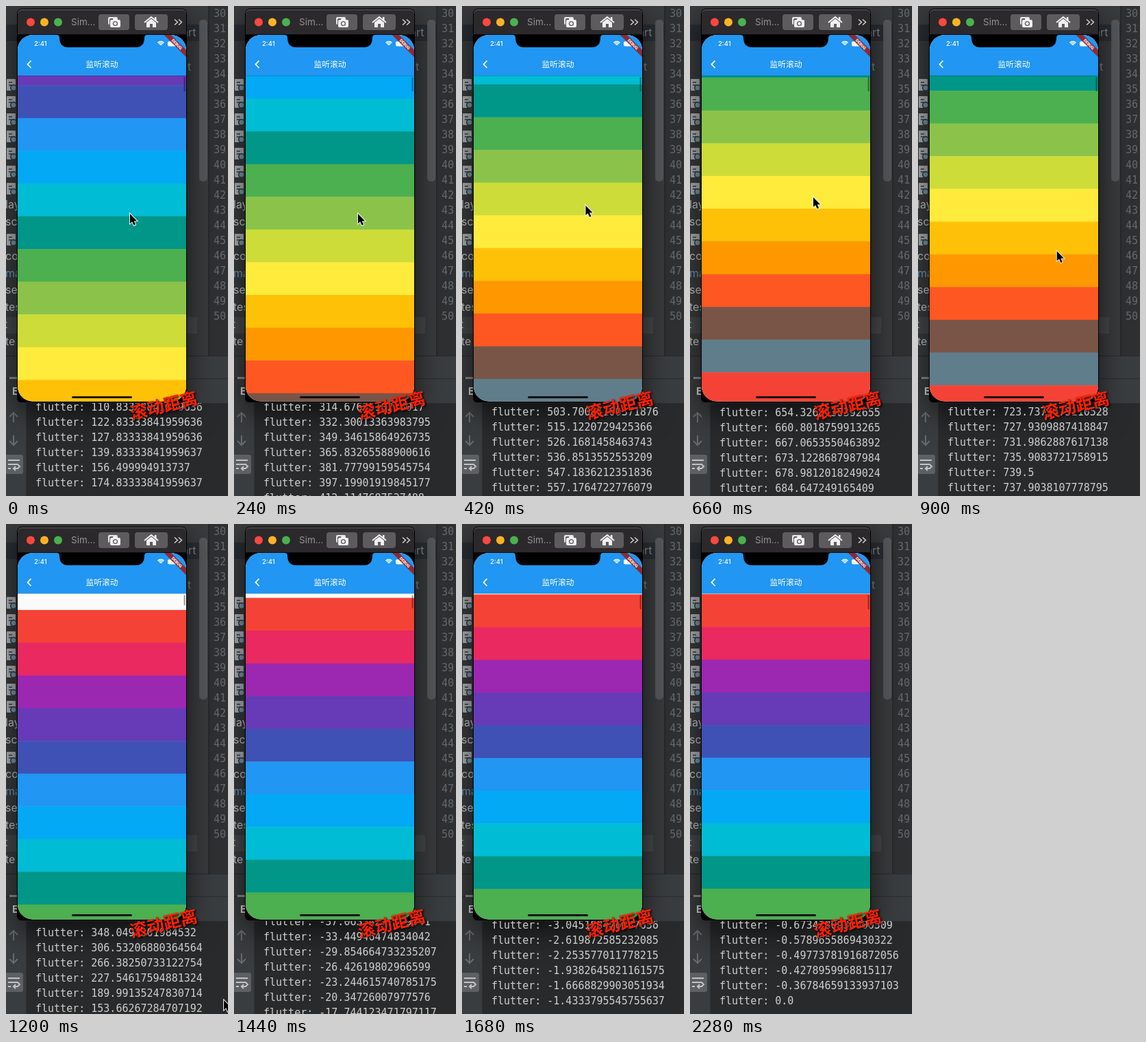
Write an HTML page with a canvas that moves like this. It is 324 px wide and 712 px high and loops after 2.34 s.

```html
<!DOCTYPE html>
<html lang="zh">
<head>
<meta charset="utf-8">
<style>
  html, body { margin: 0; width: 100%; height: 100%; overflow: hidden; background: #2b2b2b; }
  canvas { display: block; }
</style>
</head>
<body>
<canvas id="stage" width="324" height="712"></canvas>
<script>
const ctx = document.getElementById('stage').getContext('2d');
const LOOP = 2340, STEP = 60;
const MONO = '"DejaVu Sans Mono", monospace';
const SANS = 'Inter, "Liberation Sans", sans-serif';
const CJK = '"Noto Sans CJK SC", "Noto Sans CJK", sans-serif';
const SCALE = 0.5945, ITEM = 80 * SCALE, LIST_TOP = 101.8;
const COLORS = ['#f44336', '#e9295f', '#9c27b0', '#673ab7', '#3f51b5', '#2196f3',
  '#03a9f4', '#00bcd4', '#009688', '#4caf50', '#8bc34a', '#cddc39',
  '#ffeb3b', '#ffc107', '#ff9800', '#ff5722', '#795548', '#607d8b'];

// Printed values, keyed by the index of the first line of each run.
const PRINTED = {
  0: '110.83333841959636 122.83333841959636 127.83333841959636 139.83333841959637 156.499994913737 174.83333841959637',
  12: '314.6763510278017 332.30013363983795 349.34615864926735 365.83265588900616 381.77799159545754 397.19901919845177 412.1147687537488',
  42: '654.3268130392655 660.8018759913265 667.0653550463892 673.1228687987984 678.9812018249024 684.647249165409',
  60: '737.9038107778795 716.5704825308092 687.9038107778795 652.9038107778795 617.9038107778795 582.9038107778795 535.9038107778795',
  70: '348.0493301984532 306.53206880364564 266.38250733122754 227.54617594881324 189.99135247830714 153.66267284707192',
  105: '-3.045188476937656 -2.619872585232085 -2.253577011778215 -1.9382645821161575 -1.6668829903051934 -1.4333795545755637',
  115: '-0.6734180930400509 -0.5789655869430322 -0.49773781916872056 -0.4278959968815117 -0.36784659133937103 0.0'
};
const log = [];
for (const first in PRINTED) {
  PRINTED[first].split(' ').forEach((value, n) => { log[+first + n] = value; });
}

// Scroll position per 60 Hz tick: fling, drag back, fling, then spring at the edge.
function scrollAt(tick) {
  const drag = 0.96715;
  if (tick < 59) return 851.38 - 454.18 * drag ** (tick - 17);
  if (tick < 60) return 739.5 - 1.6 * (tick - 59);
  if (tick < 66) {
    const i = Math.floor(tick);
    return +log[i] + (log[i + 1] - log[i]) * (tick - i);
  }
  if (tick < 67) return 535.9 - 54 * (tick - 66);
  if (tick < 79.64) return -916 + 1264.05 * drag ** (tick - 70);
  if (tick >= 120) return 0;
  const s = (tick - 79.64) / 60;
  return -142 * (Math.exp(-9.08 * s) - Math.exp(-22 * s));
}

const TICKS = [[0, 11.05], [240, 25.1], [660, 53.2], [742, 59], [868, 60], [1020, 70], [1200, 81.9], [1680, 113], [1860, 124]];
const LINES = [[0, 5], [240, 17.01], [660, 46.64], [850, 59], [924, 60], [1020, 65.27], [1200, 74.5], [1680, 110], [1860, 120]];
const POINTER = [[0, 181, 302], [240, 181, 302], [600, 180, 278], [868, 180, 278], [1020, 288, 650], [1200, 318, 692], [1260, 340, 716]];

function track(keys, t, axis = 1) {
  const i = keys.findIndex(k => k[0] > t);
  if (i < 0) return keys[keys.length - 1][axis];
  const a = keys[i - 1], b = keys[i];
  return a[axis] + (b[axis] - a[axis]) * (t - a[0]) / (b[0] - a[0]);
}

function rect(x, y, w, h, color) {
  ctx.fillStyle = color;
  ctx.fillRect(x, y, w, h);
}
function round(x, y, w, h, r, color) {
  ctx.fillStyle = color;
  ctx.beginPath();
  ctx.roundRect(x, y, w, h, r);
  ctx.fill();
}
function disc(x, y, r, color) {
  ctx.fillStyle = color;
  ctx.beginPath();
  ctx.arc(x, y, r, 0, 7);
  ctx.fill();
}
function line(points, color, width) {
  ctx.strokeStyle = color;
  ctx.lineWidth = width;
  ctx.beginPath();
  points.forEach(p => ctx.lineTo(p[0], p[1]));
  ctx.stroke();
}
function text(str, x, y, font, color, align = 'left') {
  ctx.font = font;
  ctx.fillStyle = color;
  ctx.textAlign = align;
  ctx.textBaseline = 'middle';
  ctx.fillText(str, x, y);
}

function drawEditor() {
  rect(0, 0, 324, 712, '#393b3d');
  rect(0, 27, 296, 24, '#292d33');
  rect(0, 452, 279, 24, '#45484a');
  text('art', 257, 39, '16px ' + SANS, '#85888a');
  text('t', 265, 89, '16px ' + SANS, '#85888a');
  round(282, 20, 12, 235, 5, '#55585a');
  rect(297, 0, 27, 508, '#2e3032');
  rect(295, 0, 2, 508, '#272829');
  for (let n = 30; n <= 50; n++) text(n, 303, 12.3 + (n - 30) * 22, '15px ' + MONO, '#66696c');

  [115, 140, 165, 190, 215, 241, 266, 340].forEach(y => {
    round(1, y - 9, 13, 17, 1, '#adb1b4');
    line([[4, y - 4], [9, y - 4]], '#55595c', 2);
    line([[4, y], [9, y]], '#55595c', 2);
    disc(11, y + 4, 5, '#33373a');
    disc(11, y + 4, 3.4, '#7698ad');
  });
  [['lay', 289], ['scr', 314], ['cor', 364], ['ma', 389], ['sec', 413], ['tes', 438], ['t', 463], ['te', 488]]
    .forEach(([s, y]) => text(s, s === 't' ? -3 : -1, y, '16px ' + SANS, s === 'ma' ? '#6f9dbb' : '#c4c6c8'));

  rect(0, 508, 324, 70, '#3a3d3f');
  rect(0, 508, 324, 1, '#292a2b');
  rect(0, 541, 324, 1, '#2b2d2e');
  rect(5, 539, 14, 3, '#8b8e90');
  text('E', 9, 560, 'bold 15px ' + SANS, '#d5d5d5');
}

function drawConsole(t) {
  ctx.save();
  ctx.beginPath();
  ctx.rect(0, 577, 324, 135);
  ctx.clip();
  rect(0, 577, 324, 135, '#292a2c');
  rect(0, 577, 29, 135, '#3a3d3f');
  rect(29, 577, 1, 135, '#303233');
  const gray = '#686b6d', light = '#c0c2c4';
  line([[11, 605], [11, 591]], gray, 2);
  line([[5, 597], [11, 591], [17, 597]], gray, 2);
  line([[11, 624], [11, 638]], gray, 2);
  line([[5, 632], [11, 638], [17, 632]], gray, 2);
  round(-4, 652, 29, 28, 3, '#5d6062');
  line([[3, 660], [20, 660]], light, 2);
  line([[3, 666], [17, 666], [20, 669], [17, 672], [11, 672]], light, 2);
  line([[14, 669], [11, 672], [14, 675]], light, 2);
  line([[3, 672], [7, 672]], light, 2);
  ctx.restore();
}

// Printed over the window shadow so the text keeps its brightness.
function drawLog(t) {
  ctx.save();
  ctx.beginPath();
  ctx.rect(30, 577, 294, 135);
  ctx.clip();
  const bottom = track(LINES, t);
  for (let i = Math.max(0, Math.floor(bottom) - 6); i <= Math.ceil(bottom); i++) {
    const value = log[i] || String(scrollAt(i));
    text('flutter: ' + value, 43, 694.4 + 22 * (i - bottom), '15px ' + MONO, '#cfcfcf');
  }
  ctx.restore();
}

function drawWindow() {
  ctx.save();
  ctx.shadowColor = 'rgba(0,0,0,.65)';
  ctx.shadowBlur = 44;
  ctx.shadowOffsetY = 14;
  round(16, 4, 248, 572, [7, 7, 6, 6], '#000');
  ctx.restore();
  round(17, 5, 246, 37, [6, 6, 0, 0], '#69676a');
  round(17, 6, 246, 36, [6, 6, 0, 0], '#2b292b');
  rect(17, 41, 246, 1, '#0c0c0c');
  ['#fc4740', '#fdb324', '#4bb04f'].forEach((c, i) => disc(36 + 20 * i, 23.5, 6, c));
  text('Sim…', 95, 24, '13.5px ' + SANS, '#939194');
  round(135, 12, 45, 23, 4, '#5d5b5e');
  round(188, 12, 48, 23, 4, '#5d5b5e');

  round(149, 16, 14, 11, 2, '#e8e8e8');
  round(151, 18, 17, 14, 2, '#5d5b5e');
  round(152, 20, 15, 11, 2, '#f0f0f0');
  round(156, 18, 7, 4, 1, '#f0f0f0');
  disc(159.5, 25.5, 3.6, '#5d5b5e');
  disc(159.5, 25.5, 2.2, '#f0f0f0');

  line([[202, 24], [212, 16], [222, 24]], '#f0f0f0', 2);
  rect(217, 16, 2.5, 5, '#f0f0f0');
  ctx.fillStyle = '#f0f0f0';
  ctx.beginPath();
  [[205, 24], [212, 18.5], [219, 24], [219, 31], [214, 31], [214, 26], [210, 26], [210, 31], [205, 31]]
    .forEach(p => ctx.lineTo(...p));
  ctx.fill();
  [246, 252].forEach(x => line([[x, 19.5], [x + 4.5, 23.5], [x, 27.5]], '#d8d8d8', 1.4));
}

function drawAppBar() {
  rect(17, 42, 246, 59, '#2196f3');
  rect(17, 101, 246, 1, 'rgba(0,0,0,.16)');
  text('2:41', 41, 55.5, '500 9.5px ' + SANS, '#fff');
  ctx.fillStyle = '#000';
  ctx.beginPath();
  ctx.moveTo(74, 42);
  ctx.quadraticCurveTo(78, 42, 78, 46);
  ctx.quadraticCurveTo(78, 60, 91, 60);
  ctx.lineTo(189, 60);
  ctx.quadraticCurveTo(202, 60, 202, 46);
  ctx.quadraticCurveTo(202, 42, 206, 42);
  ctx.fill();

  ctx.strokeStyle = '#fff';
  ctx.lineWidth = 1.5;
  [2, 4.2, 6.4].forEach(r => {
    ctx.beginPath();
    ctx.arc(226, 58, r, -Math.PI * 0.75, -Math.PI * 0.25);
    ctx.stroke();
  });
  round(236, 51.5, 13, 7, 2, '#fff');
  line([[36.5, 79.5], [31.5, 84.8], [36.5, 90]], '#fff', 1.8);
  text('监听滚动', 140, 84.6, '500 11.8px ' + CJK, '#fff', 'center');

  ctx.save();
  ctx.translate(249.4, 55.6);
  ctx.rotate(Math.PI / 4);
  rect(-40, -3.6, 80, 7.2, '#8a2b34');
  text('DEBUG', 0, 0.3, '900 6px Roboto, sans-serif', '#fff', 'center');
  ctx.restore();
}

function drawScreen(t) {
  ctx.save();
  ctx.beginPath();
  ctx.roundRect(17, 42, 246, 532.5, 22);
  ctx.clip();
  rect(17, 42, 246, 533, '#fafafa');
  const offset = scrollAt(track(TICKS, t)) * SCALE;
  for (let i = Math.max(0, Math.floor(offset / ITEM)); ; i++) {
    const y = LIST_TOP + i * ITEM - offset;
    if (y > 575) break;
    rect(17, y, 246, ITEM + 0.5, COLORS[i % COLORS.length]);
  }
  const squeeze = Math.min(6, Math.max(0, -offset * 0.26));
  round(259.6, 103.2, 2, 21 - squeeze, 1, 'rgba(0,0,0,.4)');
  drawAppBar();
  round(96, 567, 88, 3, 1.5, 'rgba(0,0,0,.87)');
  ctx.restore();
}

function drawCaption() {
  ctx.save();
  ctx.translate(230, 580.3);
  ctx.rotate(-0.235);
  ctx.shadowColor = '#000';
  ctx.shadowBlur = 3;
  ctx.shadowOffsetX = 1.5;
  ctx.shadowOffsetY = 1.5;
  text('滚动距离', 0, 0, 'bold 25px ' + CJK, '#fb2105', 'center');
  ctx.restore();
}

function drawPointer(t) {
  if (t >= 1260) return;
  ctx.save();
  ctx.translate(track(POINTER, t, 1), track(POINTER, t, 2));
  ctx.beginPath();
  [[0, 0], [0, 14], [3.2, 11.2], [5.6, 16.6], [8, 15.6], [5.7, 10.4], [10, 10.2]]
    .forEach(p => ctx.lineTo(...p));
  ctx.closePath();
  ctx.lineWidth = 2;
  ctx.strokeStyle = '#eee';
  ctx.stroke();
  ctx.fillStyle = '#000';
  ctx.fill();
  ctx.restore();
}

const start = performance.now();
function frame() {
  const t = Math.floor((performance.now() - start) % LOOP / STEP) * STEP;
  drawEditor();
  drawConsole();
  drawWindow();
  drawLog(t);
  drawScreen(t);
  drawCaption();
  drawPointer(t);
  requestAnimationFrame(frame);
}
frame();
</script>
</body>
</html>
```
